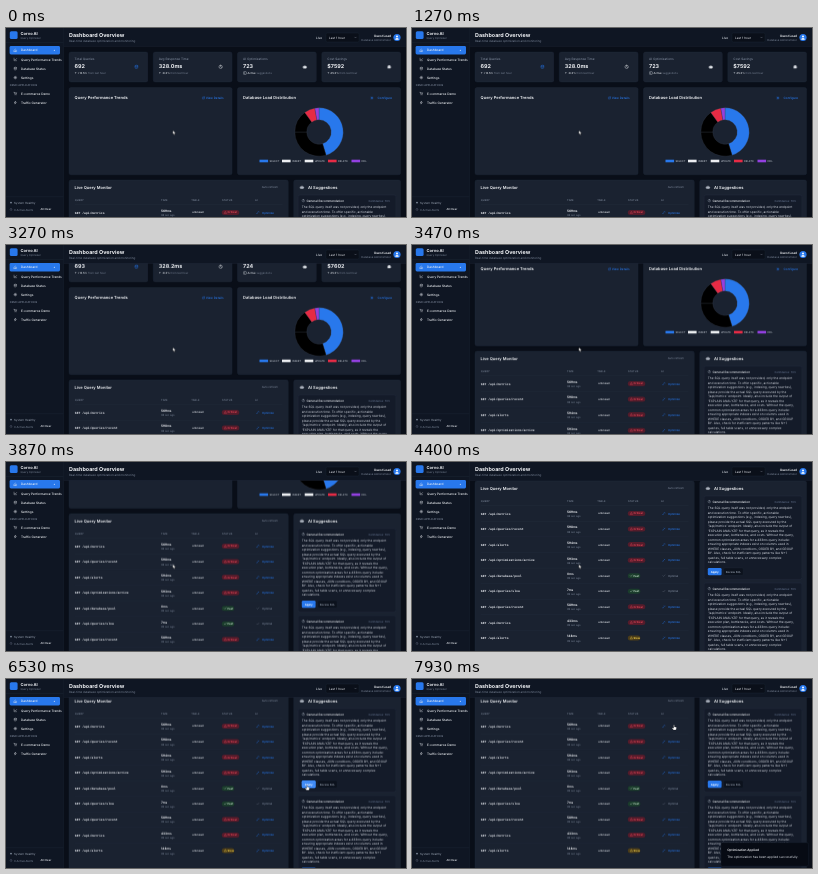
These frames come from a looping animation (400x189 px, 8 s). An HTML page:

```html
<!DOCTYPE html>
<html lang="en">
<head>
<meta charset="utf-8">
<title>Dashboard</title>
<style>
  html, body { margin: 0; width: 100%; height: 100%; overflow: hidden; background: #090e18; }
  svg { display: block; width: 100%; height: 100%; }
  text { font-family: Inter, sans-serif; text-rendering: geometricPrecision; white-space: pre; }
  .mono { font-family: "Liberation Mono", monospace; }
</style>
</head>
<body>
<svg id="stage" viewBox="0 0 400 189"></svg>
<script>
const LOOP = 8000;
const PAGE = '#090e18', SIDE = '#0f1623', CARD = '#1a2230', LINE = '#273142';
const WHITE = '#f3f5f8', GRAY = '#7b8698', BLUE = '#2878ec', RED = '#e62b45', PURPLE = '#9340e0';
const stage = document.getElementById('stage');

function add(parent, tag, attrs = {}) {
  const el = document.createElementNS('http://www.w3.org/2000/svg', tag);
  for (const key in attrs) el.setAttribute(key, attrs[key]);
  return parent.appendChild(el);
}
const group = parent => add(parent, 'g');
const box = (parent, x, y, width, height, fill, rx = 0, stroke = 'none') =>
  add(parent, 'rect', { x, y, width, height, fill, rx, stroke, 'stroke-width': .25 });
const dot = (parent, cx, cy, r, fill) => add(parent, 'circle', { cx, cy, r, fill });

// y is the middle of the line
function label(parent, x, y, str, size, fill = WHITE, weight = 400, attrs = {}) {
  const el = add(parent, 'text', { x, y: y + size * .36, 'font-size': size, fill, 'font-weight': weight, ...attrs });
  el.textContent = str;
  return el;
}

const ICONS = {
  home: 'M3 11 12 3l9 8v10H3zM9 21v-8h6v8',
  trend: 'M3 3v18h18M6 15l5-5 4 4 6-8',
  db: 'M4 5c0-4 16-4 16 0s-16 4-16 0v14c0 4 16 4 16 0V5M4 12c0 4 16 4 16 0',
  gear: 'M12 8a4 4 0 1 0 0 8 4 4 0 0 0 0-8M12 2v4M12 18v4M2 12h4M18 12h4M5 5l3 3M16 16l3 3M5 19l3-3M16 8l3-3',
  cart: 'M2 3h4l3 12h10l3-9H7M9 20h1M18 20h1',
  bolt: 'M13 2 4 14h7l-1 8 10-12h-8z',
  clock: 'M12 2a10 10 0 1 0 0 20 10 10 0 0 0 0-20M12 6v6l4 3',
  bot: 'M4 9h16v11H4zM12 9V4M9 14v2M15 14v2M1 14h3M20 14h3',
  bag: 'M4 9h16v11H4zM8 9V4h8v5M4 14h16',
  open: 'M10 4H4v16h16v-6M14 3h7v7M21 3 10 14',
  pen: 'M4 20 20 4M15 3l6 6M4 20l5-1',
  check: 'M4 12l6 6L21 5',
  warn: 'M12 3 2 21h20zM12 10v5',
  chevron: 'M5 8l7 8 7-8'
};
const icon = (parent, name, cx, cy, size, stroke, fill = 'none') => add(parent, 'path', {
  d: ICONS[name], fill, stroke, 'stroke-width': 2.4, 'stroke-linecap': 'round', 'stroke-linejoin': 'round',
  transform: `translate(${cx - size / 2} ${cy - size / 2}) scale(${size / 24})`
});

function play(el, steps) {
  el.animate(steps.map(([time, frame, easing = 'linear']) => ({ offset: time / LOOP, easing, ...frame })),
    { duration: LOOP, iterations: Infinity });
}
// Visible only inside the given [from, to] spans
function showDuring(el, ...spans) {
  const steps = [[0, { opacity: spans[0][0] === 0 ? 1 : 0 }, 'step-end']];
  for (const [from, to] of spans) {
    if (from > 0) steps.push([from, { opacity: 1 }, 'step-end']);
    if (to < LOOP) steps.push([to, { opacity: 0 }, 'step-end']);
  }
  steps.push([LOOP, { opacity: spans.at(-1)[1] === LOOP ? 1 : 0 }]);
  play(el, steps);
}
const move = (x, y) => ({ transform: `translate(${x}px, ${y}px)` });

box(stage, 0, 0, 400, 189, PAGE);
const page = group(stage);

// Metric cards
const UPDATE_AT = 1400;
const metrics = [
  ['Total Queries', '692', '693', '↑ +12.5%', 'from last hour', 'db'],
  ['Avg Response Time', '328.0ms', '328.2ms', '↑ -8.2%', 'from last hour', 'clock'],
  ['AI Optimizations', '723', '724', '⊕ Active', 'suggestions', 'bot'],
  ['Cost Savings', '$7592', '$7602', '↑ 45.2%', 'from last hour', 'bag']
];
metrics.forEach(([name, before, after, change, note, symbol], i) => {
  const x = 63 + i * 84.25, tx = x + 5.6;
  box(page, x, 24, 78.85, 30, CARD, 1.8, LINE);
  label(page, tx, 31.2, name, 3.15, GRAY, 500);
  showDuring(label(page, tx, 37.6, before, 5.4, WHITE, 700), [0, UPDATE_AT]);
  showDuring(label(page, tx, 37.6, after, 5.4, WHITE, 700), [UPDATE_AT, LOOP]);
  const line = label(page, tx, 45, change + ' ', 2.7, '#dfe4ea', 500);
  const rest = add(line, 'tspan', { fill: GRAY, 'font-weight': 400 });
  rest.textContent = note;
  icon(page, symbol, x + 67.4, 38.8, 4, i ? WHITE : BLUE, i > 1 ? '#cfd5dd' : 'none');
});

// Chart cards
function chartCard(x, title, action, symbol) {
  box(page, x, 59.5, 163.1, 87.3, CARD, 1.8, LINE);
  label(page, x + 5.6, 70, title, 4.05, WHITE, 600);
  label(page, x + 154.6, 70, action, 3.05, BLUE, 500, { 'text-anchor': 'end' });
  icon(page, symbol, x + 134.4, 70, 3, BLUE);
}
chartCard(63, 'Query Performance Trends', 'View Details', 'open');
chartCard(231.5, 'Database Load Distribution', 'Configure', 'gear');

const polar = (r, deg) => {
  const a = (deg - 90) * Math.PI / 180;
  return `${(313 + r * Math.cos(a)).toFixed(2)} ${(104 + r * Math.sin(a)).toFixed(2)}`;
};
const slices = [[0, 163, BLUE], [163, 270, '#000'], [270, 324, '#000'], [324, 350, RED], [350, 360, PURPLE]];
for (const [from, to, fill] of slices) {
  add(page, 'path', {
    d: `M${polar(24.2, from)}A24.2 24.2 0 0 1 ${polar(24.2, to)}L${polar(12.2, to)}A12.2 12.2 0 0 0 ${polar(12.2, from)}Z`,
    fill, stroke: '#3a4350', 'stroke-width': .3
  });
}
const legend = [['SELECT', 253.5, BLUE], ['INSERT', 276, '#eceef1'], ['UPDATE', 298.7, '#eceef1'],
  ['DELETE', 322, RED], ['DDL', 345.5, PURPLE]];
for (const [name, x, fill] of legend) {
  box(page, x, 131.7, 8.6, 2.6, fill);
  label(page, x + 10, 133.1, name, 2.6, '#c3c9d2');
}

// Query table
box(page, 63, 152, 219.3, 190, CARD, 1.8, LINE);
label(page, 68.6, 159.4, 'Live Query Monitor', 4.05, WHITE, 600);
label(page, 272, 159.4, 'Auto refresh', 2.8, GRAY, 400, { 'text-anchor': 'end' });
[['QUERY', 68.8], ['TIME', 155], ['TABLE', 185.2], ['STATUS', 216], ['AI', 249]].forEach(([name, x]) =>
  label(page, x, 172.3, name, 2.5, GRAY, 500, { 'letter-spacing': .12 }));

const statuses = {
  Critical: ['#551c2b', '#f0485a', 'warn', 17.5],
  Fast: ['#1b3d2c', '#d9f5df', 'check', 12.5],
  Slow: ['#4a3c1a', '#f2cf4a', 'warn', 12.5]
};
const rows = [
  ['metrics', 569, 'Critical'], ['queries/recent', 598, 'Critical'], ['alerts', 594, 'Critical'],
  ['optimizations/active', 593, 'Critical'], ['database/pool', 0, 'Fast'], ['queries/slow', 7, 'Fast'],
  ['queries/recent', 589, 'Critical'], ['metrics', 433, 'Critical'], ['alerts', 148, 'Slow']
];
rows.forEach(([path, ms, status], i) => {
  const y = 184.5 + i * 15.56;
  const [bg, fg, symbol, width] = statuses[status];
  box(page, 68.6, y - 7.8, 208, .25, LINE);
  label(page, 68.8, y, 'GET /api/' + path, 3.1, '#e8ebf0', 700, { class: 'mono' });
  label(page, 155, y - 1.7, ms + 'ms', 3.15, WHITE, 600);
  label(page, 155, y + 2.7, (i < 4 ? 38 : 39) + ' sec ago', 2.6, GRAY);
  label(page, 186.3, y, 'unknown', 2.7, '#e3e7ec', 500);
  box(page, 215.8, y - 2.5, width, 5, bg, 2.5);
  icon(page, symbol, 219.2, y, 2.7, fg);
  label(page, 221.6, y, status, 2.7, fg, 600);
  const fast = status === 'Fast', color = fast ? GRAY : BLUE;
  icon(page, fast ? 'check' : 'pen', 251.8, y, 2.9, color);
  const action = label(page, 256, y, fast ? 'Optimal' : 'Optimize', 2.8, color, 500);
  if (i === 0) showDuring(action, [0, 7650]);
});

// Suggestions
box(page, 287.7, 152, 106.9, 190, CARD, 1.8, LINE);
icon(page, 'bot', 296, 159.2, 4, '#d8dde5', '#8b95a5');
label(page, 302, 159.4, 'AI Suggestions', 4.05, WHITE, 600);
const advice = `The SQL query itself was not provided, only the endpoint
and execution time. To offer specific, actionable
optimization suggestions (e.g., indexing, query rewrites),
please provide the actual SQL query executed by the
'/api/metrics' endpoint. Ideally, also include the output of
'EXPLAIN ANALYZE' for that query, as it reveals the
execution plan, bottlenecks, and costs. Without the query,
common optimization areas for a 433ms query include:
ensuring appropriate indexes exist on columns used in
WHERE clauses, JOIN conditions, ORDER BY, and GROUP
BY. Also, check for inefficient query patterns like N+1
queries, full table scans, or unnecessary complex
calculations.`.split('\n');
for (const top of [167, 254]) {
  box(page, 292.2, top, 97.6, 83.4, '#141b29', 1.8, '#2c374a');
  icon(page, 'clock', 297.3, top + 5.6, 3, '#b9c2cf');
  label(page, 300.4, top + 5.6, 'General Recommendation', 3.05, '#e8ebf0', 500);
  label(page, 384.5, top + 5.6, 'Confidence: 70%', 2.7, '#6e7f9c', 400, { 'text-anchor': 'end' });
  advice.forEach((line, i) => label(page, 295.8, top + 12 + i * 4.52, line, 3.15, '#d5dae2'));
  box(page, 295.8, top + 71.9, 13.8, 7.4, BLUE, 1.3);
  if (top === 167) showDuring(box(page, 295.8, top + 71.9, 13.8, 7.4, '#418bf5', 1.3), [6130, 7070]);
  label(page, 302.7, top + 75.6, 'Apply', 2.8, '#fff', 600, { 'text-anchor': 'middle' });
  box(page, 311.8, top + 71.9, 19.4, 7.4, '#0c121d', 1.3, LINE);
  label(page, 321.5, top + 75.6, 'Review SQL', 2.7, '#9aa4b3', 500, { 'text-anchor': 'middle' });
}

play(page, [[0, 0], [3070, 0], [3270, 17], [3500, 50], [3870, 100.3], [4130, 121.5], [4400, 133], [4700, 137.4], [LOOP, 137.4]]
  .map(([time, y]) => [time, move(0, -y)]));

// Header
box(stage, 57.6, 0, 342.4, 18.4, SIDE);
box(stage, 57.6, 18.2, 342.4, .25, LINE);
label(stage, 63, 7, 'Dashboard Overview', 5.4, WHITE, 700);
label(stage, 63, 13.3, 'Real-time database optimization and monitoring', 2.95, GRAY);
label(stage, 310, 9.5, 'Live', 3.1, '#dce1e8', 500);
box(stage, 320, 5, 33, 9, '#0a0f19', 1.3, LINE);
label(stage, 323, 9.5, 'Last 1 hour', 3.1, '#e8ebf0');
icon(stage, 'chevron', 349.5, 9.6, 2.4, '#c3c9d2');
label(stage, 385, 7.4, 'Guest Lead', 3.15, WHITE, 600, { 'text-anchor': 'end' });
label(stage, 385, 11.9, 'Database Administrator', 2.7, GRAY, 400, { 'text-anchor': 'end' });
dot(stage, 391, 9.5, 3.6, BLUE);
dot(stage, 391, 8.5, 1, '#fff');
add(stage, 'path', { d: 'M389.2 11.7a1.8 1.6 0 0 1 3.6 0z', fill: '#fff' });

// Sidebar
box(stage, 0, 0, 57.6, 189, SIDE);
box(stage, 57.4, 0, .25, 189, LINE);
box(stage, 3.8, 3.2, 7.8, 7.8, BLUE, 1.5);
label(stage, 14.6, 6, 'Corvo AI', 4.05, WHITE, 700);
label(stage, 14.6, 10.5, 'Query Optimizer', 2.6, GRAY);
box(stage, 0, 14.2, 57.4, .25, LINE);
box(stage, 3.6, 18.1, 50.4, 8.4, BLUE, 1.4);
dot(stage, 48.3, 22.3, .5, '#fff');
const nav = [['home', 'Dashboard', 22.3], ['trend', 'Query Performance Trends', 31.4], ['db', 'Database Status', 40.5],
  ['gear', 'Settings', 49.6], ['cart', 'E-commerce Demo', 65.6], ['bolt', 'Traffic Generator', 74.7]];
for (const [symbol, name, y] of nav) {
  icon(stage, symbol, 9.3, y, 3.4, '#e3e7ed');
  label(stage, 15, y, name, 3.15, '#eef1f5', 500);
}
label(stage, 3.8, 57.3, 'DEMO APPLICATIONS', 2.6, GRAY, 500);
box(stage, 0, 168.8, 57.4, .25, LINE);
dot(stage, 5, 174.6, .9, '#7f8b9c');
label(stage, 8, 174.6, 'System Healthy', 2.9, '#98a2b1');
icon(stage, 'clock', 5, 181.5, 2.4, GRAY);
label(stage, 8, 181.5, '0 Active Alerts', 2.8, GRAY);
label(stage, 34.5, 181.5, 'All Clear', 2.7, '#e8ebf0', 500);

// Toast
const toast = group(stage);
box(toast, 309, 163.6, 87.4, 23.6, '#070b14', 1.5, LINE);
label(toast, 315.2, 171.3, 'Optimization Applied', 3.15, WHITE, 600);
label(toast, 315.2, 177.4, 'The optimization has been applied successfully.', 3.15, '#e0e4ea');
play(toast, [[0, { ...move(0, 26), opacity: 0 }], [6660, { ...move(0, 26), opacity: 0 }],
  [6860, { ...move(0, 0), opacity: 1 }], [LOOP, { ...move(0, 0), opacity: 1 }]]);

// Pointer
const pointer = group(stage);
const arrow = add(pointer, 'path', {
  d: 'M0 0V3.9L.9 3.1 1.6 4.6 2.3 4.3 1.6 2.8H2.8Z', fill: '#fff', stroke: '#000', 'stroke-width': .3
});
const hand = add(pointer, 'path', {
  d: 'M-.4 0Q0-.6.4 0V1.8L2.3 2.3Q2.6 2.5 2.5 3L2 5H-.5L-1.9 3.2Q-1.7 2.5-.9 2.9L-.4 3.3Z',
  fill: '#fff', stroke: '#000', 'stroke-width': .25
});
play(pointer, [[0, move(166.8, 102.4)], [5330, move(166.8, 102.4), 'ease-in-out'], [6200, move(301, 106.2)],
  [7000, move(301, 106.2), 'ease-in-out'], [7730, move(262, 46)], [LOOP, move(262, 46)]]);
showDuring(arrow, [0, 6070], [7100, 7600]);
showDuring(hand, [6070, 7100], [7600, LOOP]);
</script>
</body>
</html>
```
